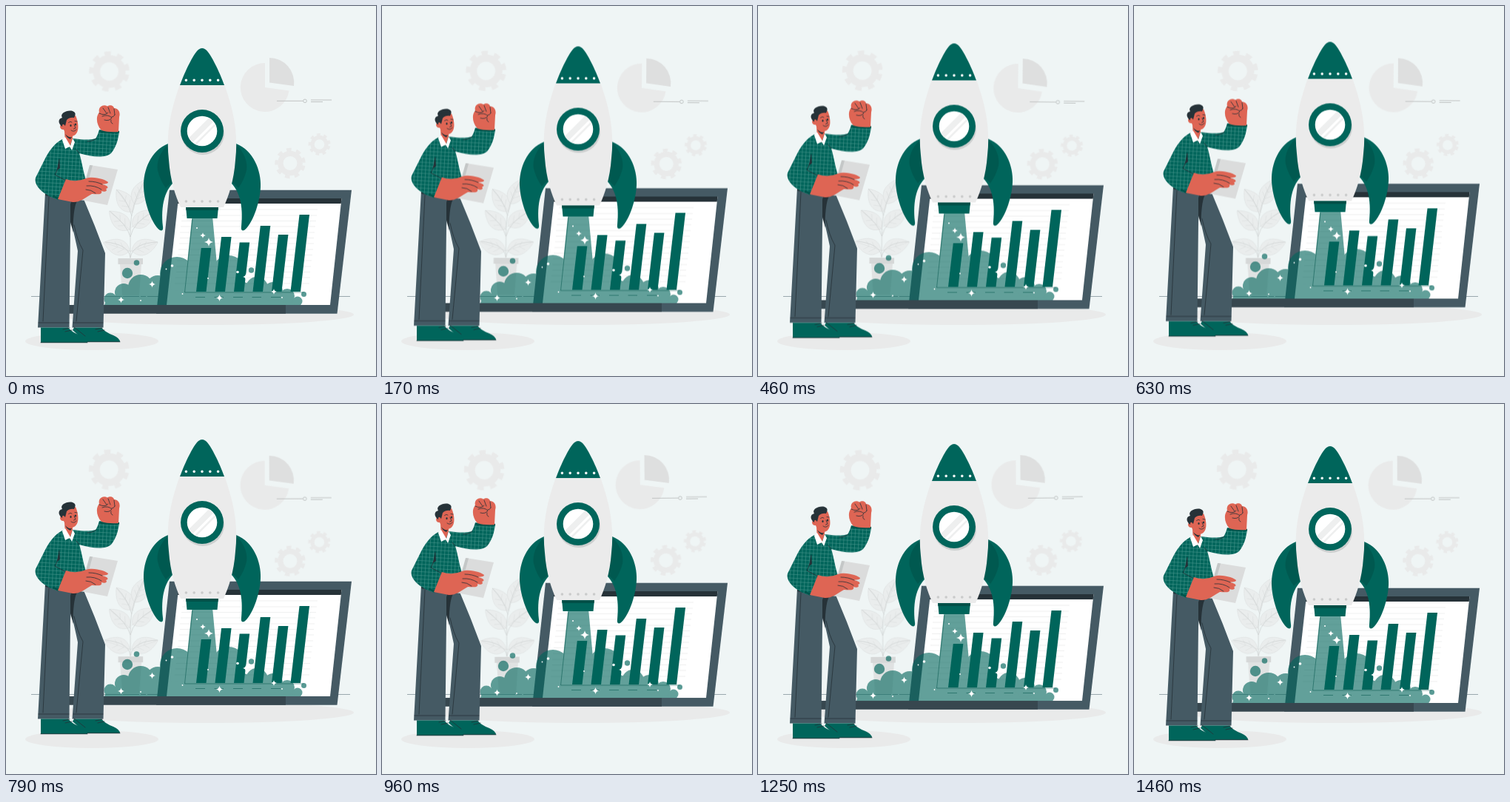
Recreate the animation shown at these times as an HTML page without scripts. Size 500x500 px, loop 1500 ms.

```html
<!DOCTYPE html>
<html lang="en">
<head>
<meta charset="utf-8">
<title>Rocket launch</title>
<style>
  html, body { margin: 0; width: 100%; height: 100%; overflow: hidden; background: #eff5f5; }
  svg { display: block; width: 100vw; height: 100vh; }
  .teal { fill: #00655b; }
  .deep { fill: #005950; }
  .pale { fill: #e9eaea; }
  .slate { fill: #455a64; }
  .ink { fill: #263238; }
  .skin { fill: #de6554; }
  .line { fill: none; stroke: #263238; stroke-width: .8; stroke-linecap: round; stroke-linejoin: round; }
  .thin { fill: none; stroke: #bbbfbf; stroke-width: .9; }
  .stem { fill: none; stroke: #d0d3d3; stroke-width: .8; }
  .sway { transform-origin: 250px 250px; animation: sway 750ms cubic-bezier(.37, 0, .63, 1) -375ms infinite alternate; }
  .lift { animation: lift 1500ms linear infinite; }
  @keyframes sway { from { transform: rotate(-.62deg); } to { transform: rotate(.62deg); } }
  @keyframes lift {
    0%, 97.5%, 100% { transform: translateY(0); }
    11.3% { transform: translateY(-2.5px); }
    30.7% { transform: translateY(-6.5px); }
    42% { transform: translateY(-8.6px); }
    49% { transform: translateY(-9.2px); }
    53% { transform: translateY(-9px); }
    64% { transform: translateY(-7px); }
    83.3% { transform: translateY(-3px); }
  }
</style>
</head>
<body>
<svg viewBox="0 0 500 500">
  <defs>
    <g id="gear" fill="none" stroke="#e9eaea">
      <circle r=".64" stroke-width=".36"/>
      <circle r=".89" stroke-width=".24" pathLength="16" stroke-dasharray="1" stroke-dashoffset="1.5"/>
    </g>
    <g id="leaf">
      <path d="M0 0C-14-7-14-22 0-37C14-22 14-7 0 0Z" fill="#eaeded" stroke="#dcdfdf" stroke-width=".6"/>
      <path fill="none" stroke="#dcdfdf" stroke-width=".6" d="M0 2V-34M0-8L-7-15M0-8L7-15M0-17L-6-23M0-17L6-23"/>
    </g>
    <path id="star" fill="#fff" d="M0-1Q.12-.12 1 0Q.12 .12 0 1Q-.12 .12-1 0Q-.12-.12 0-1Z"/>
    <path id="bar" class="teal" d="M0 0H13.5V-1H0Z"/>
    <g id="fin">
      <path class="teal" d="M219 186C196 195 185 222 186 245C187 268 198 296 208 303Q213 305 212 298C209 270 214 246 232 234Z"/>
      <path class="deep" d="M219 187C208 198 203 211 205 222Q208 235 216 246Q222 239 232 234Z"/>
    </g>
    <pattern id="check" width="5" height="5" patternUnits="userSpaceOnUse" patternTransform="rotate(3)">
      <path fill="#00655b" d="M0 0H5V5H0Z"/>
      <path d="M0 .5H5M.5 0V5" stroke="#4d968d" stroke-width=".55"/>
    </pattern>
    <clipPath id="above"><path d="M100 250H440V404H100Z"/></clipPath>
    <clipPath id="glass"><circle cx="265" cy="169" r="20"/></clipPath>
  </defs>

  <rect width="500" height="500" fill="#eff5f5"/>

  <g class="sway">
    <use href="#gear" transform="translate(139.5 88.5) scale(27)"/>
    <use href="#gear" transform="translate(384 212.5) scale(20.5)"/>
    <use href="#gear" transform="translate(423.5 187) scale(14.8)"/>
    <path class="pale" d="M350 77A33 33 0 1 0 382.5 114.5L350 110Z"/>
    <path fill="#dedfdf" d="M356 70V103.500L389 108A33.500 33.500 0 0 0 356 70Z"/>
    <path class="thin" d="M366 128.300H401.500M412 127H440M412 129.500H428"/>
    <circle class="thin" cx="404" cy="128.300" r="2.300"/>

    <use href="#leaf" transform="translate(167 331) rotate(-72)"/>
    <use href="#leaf" transform="translate(170 331) rotate(72)"/>
    <use href="#leaf" transform="translate(167 302) rotate(-48)"/>
    <use href="#leaf" transform="translate(171 298) rotate(54)"/>
    <use href="#leaf" transform="translate(171 278) rotate(-36)"/>
    <use href="#leaf" transform="translate(174 268) rotate(24)"/>
    <path class="stem" d="M168 341V300Q169 268 186 238M168 340Q166 322 134 319M168 340Q172 320 205 319M168 312Q164 296 140 277M168 312Q172 292 200 277M170 284Q164 262 149 248"/>
    <path fill="#e0e2e2" d="M154 349H183L180 391H157Z"/>
    <path fill="#d6d8d8" d="M151.500 341H185V349H151.500Z"/>
  </g>

  <path fill="none" stroke="#455a64" stroke-width=".5" stroke-dasharray="22 2 7 2 90 1" d="M34 392.500H465"/>
  <ellipse class="pale" cx="270" cy="417" rx="200" ry="14"/>
  <ellipse class="pale" cx="116" cy="453" rx="90" ry="12"/>

  <g class="lift">
    <g id="laptop">
      <path class="slate" d="M221 248.700H467L447.500 415.700H203Z"/>
      <path fill="#fff" d="M233 260H453.500L438 404H217Z"/>
      <path class="ink" d="M233 260H453.500L452.700 267H232Z"/>
      <path fill="#37474f" d="M80 404H378V415.700H80Z"/>
      <path fill="none" stroke="#e8eaea" stroke-width=".7" d="M239 275H421M238 283H420M237 290.500H419M236 298H418M235 306H417M235 313.500H416M234 321H416M233 329H415M232 336.500H414M231 344H413M230 352H412M230 359.500H411M229 367H411M228 375H410"/>
    </g>

    <g class="teal" opacity=".61">
      <g clip-path="url(#above)">
        <path d="M251.500 284H279L286 360V404H239Z"/>
        <path d="M137 394L160 388 185 378 215 365 300 357 320 372 350 385 380 392 398 400V404H133Z"/>
        <circle cx="141" cy="396" r="8.500"/>
        <circle cx="159" cy="387" r="12"/>
        <circle cx="182" cy="380" r="17"/>
        <circle cx="205" cy="380" r="16"/>
        <circle cx="231" cy="362" r="23"/>
        <circle cx="262" cy="364" r="19"/>
        <circle cx="301" cy="359" r="22"/>
        <circle cx="339" cy="381" r="15"/>
        <circle cx="361" cy="386" r="13"/>
        <circle cx="380" cy="392" r="10"/>
        <circle cx="394" cy="399" r="6.500"/>
      </g>
    </g>
    <g class="teal" opacity=".65">
      <circle cx="164" cy="361" r="7.200"/>
      <circle cx="176.500" cy="347" r="3.800"/>
      <circle cx="331.500" cy="357" r="3.700"/>
      <circle cx="402.500" cy="389.500" r="3.500"/>
    </g>
    <path fill="none" stroke="#00534b" stroke-width=".8" opacity=".65" d="M252 288L241.500 387H402M256 393.500H269M281.500 393.500H294M307 393.500H320M332.500 393.500H345M358 393.500H371"/>

    <g transform="translate(0 386) skewX(-6.600)">
      <use href="#bar" transform="translate(257) scale(1 59)"/>
      <use href="#bar" transform="translate(282.500) scale(1 74)"/>
      <use href="#bar" transform="translate(308) scale(1 66.500)"/>
      <use href="#bar" transform="translate(333.500) scale(1 89)"/>
      <use href="#bar" transform="translate(359) scale(1 77)"/>
      <use href="#bar" transform="translate(384.500) scale(1 104)"/>
    </g>

    <use href="#star" transform="translate(274 319) scale(6)"/>
    <use href="#star" transform="translate(266 310) scale(4)"/>
    <use href="#star" transform="translate(197.500 376) scale(4.500)"/>
    <use href="#star" transform="translate(155.500 397) scale(4.500)"/>
    <use href="#star" transform="translate(288.500 394.500) scale(4.700)"/>
    <use href="#star" transform="translate(362 386) scale(4)"/>
    <use href="#star" transform="translate(324 366) scale(4)"/>
    <g fill="#fff">
      <circle cx="224.500" cy="351" r="1.800"/>
      <circle cx="313" cy="359.500" r="1.800"/>
      <circle cx="258" cy="300" r="1"/>
      <circle cx="216.500" cy="355.500" r=".9"/>
      <circle cx="238.500" cy="389" r=".9"/>
      <circle cx="273" cy="368" r=".9"/>
      <circle cx="373" cy="394" r=".9"/>
      <circle cx="182" cy="398" r=".9"/>
    </g>

    <g id="rocket">
      <use href="#fin"/>
      <use href="#fin" transform="matrix(-1 0 0 1 530 0)"/>
      <path class="teal" d="M243 271H287L285.500 287H244.500Z"/>
      <path fill="#004f47" d="M243 271H287L286.500 276H243.500Z"/>
      <path fill="#ebebeb" d="M235 106C222 142 216 173 220 208C222 236 229 257 236 272H294C301 257 308 236 310 208C314 173 308 142 295 106Z"/>
      <path class="teal" d="M235 107C242 88 253 65 260 59Q265 55 270 59C277 65 288 88 295 107Z"/>
      <path fill="none" stroke="#fff" stroke-width="3.600" stroke-linecap="round" stroke-dasharray="0 10.800" d="M243.400 100.300H287"/>
      <path fill="none" stroke="#c9caca" stroke-width="3.600" stroke-linecap="round" stroke-dasharray="0 10.800" d="M243.400 264H287"/>
      <circle cx="266" cy="172" r="29" fill="#cdcfcf"/>
      <circle class="teal" cx="265" cy="169" r="29"/>
      <circle cx="265" cy="169" r="20.300" fill="#fff"/>
      <g clip-path="url(#glass)" stroke="#eeefef">
        <path stroke-width="8" d="M246 185L282 149"/>
        <path stroke-width="2.500" d="M255 188L290 153"/>
      </g>
    </g>

    <g id="man">
      <path class="slate" d="M53 252L90 258 87 300 85.500 434.500H43Z"/>
      <path class="ink" d="M87 268L90 258 104 261Q95 270 94 288L91 306 87 292Z"/>
      <path class="slate" d="M97 262L105 261Q120 296 134 334L131.500 434.500H89.500L97 331Q93 312 90.500 302Q91 270 97 262Z"/>
      <path class="ink" d="M53 251L63 254 62 258 53 256Z"/>
      <path class="line" d="M58 258L50 426M44 428H85M91 428H131M92 296Q96 316 104 330L95 426"/>

      <path class="teal" d="M47 434.500H84Q90 442 101 445Q110 448 110 455H47Z"/>
      <path class="teal" d="M92 434.500H129Q134 441 145 445Q154 449 154 454H108L90 438Z"/>
      <path class="line" d="M47 454.800H110M110 453.800H154M77 437L86 435M80 440L89 438M121 437L130 435M124 440L133 438M92 434L107 446"/>

      <path class="skin" d="M79 169L80 184 87 193 90 183V174Z"/>
      <path class="skin" d="M78 153L94 148C98 157 100 171 92 175C86 178 80 173 78 167C73 168 71 161 76 159Z"/>
      <path class="ink" d="M76 163C70 159 70 152 76 151C72 145 83 140 90 142C96 144 93 149 92 151Q86 150 82 154L80 162Q76 157 76 163Z"/>
      <path class="ink" d="M80 173Q84 178 89 177L87 180Q82 178 80 173Z"/>
      <ellipse class="ink" cx="87.500" cy="161.500" rx="1.100" ry="1.500"/>
      <ellipse class="ink" cx="94" cy="160" rx="1.100" ry="1.500"/>
      <path class="line" d="M84.500 157.500Q87 155 89 157M93 155.500L96 156M92 160L94 165 91.500 166M88 168Q92 171 95 167"/>

      <path fill="url(#check)" d="M76 180C66 185 58 196 53 206L40 232C37 243 51 256 71 262L80 239L108 235C104 222 102 208 99 199C115 204 135 206 142 199C148 192 152 181 153 169L126 167Q124 175 121 179C111 182 100 180 90 179L86 191Z"/>
      <path class="ink" d="M72 207L69 222 73 219Z"/>
      <path class="line" d="M72 207Q71 220 66 228L81 236M122 179Q117 183 110 183M99 199L95 194"/>
      <path fill="#fff" d="M76 181L80 177 87 189 90 179 93 184 89 195 86 190 80 193Z"/>
      <path fill="none" stroke="#00534b" stroke-width="2.500" d="M126 169Q139 172 153 170M63 257L71 260"/>

      <path class="skin" d="M129 168C122 161 121 149 126 144C124 137 131 132 137 135.500C141 132.500 146 135 146 138C152 138 155 144 153 150L152 170Q138 171 129 168Z"/>
      <path class="line" d="M126 145Q134 149 138 144M131 138L136 145M138 137L141 145M146 139L147 147M130 149Q138 146 143 151Q140 156 133 154M147 147Q145 151 143 150M142 154Q141 158 144 159"/>

      <path fill="#dbdcdc" d="M114 215L151 221 137 269 101 262Z"/>
      <path fill="#c4c7c7" d="M113 215L117 215.500 104 262.500 100 262Z"/>
      <path class="skin" d="M70 261L81 234Q95 239 108 233C118 229 136 235 138 238C138 241 132 240 130 241C139 243 139 246 135 247C138 250 133 252 129 250C131 256 121 254 116 254C106 260 98 266 90 265Z"/>
      <path class="line" d="M112 237Q122 237 130 241M109 243Q120 242 129 248M108 248Q115 248 121 253"/>
    </g>
  </g>
</svg>
</body>
</html>
```
